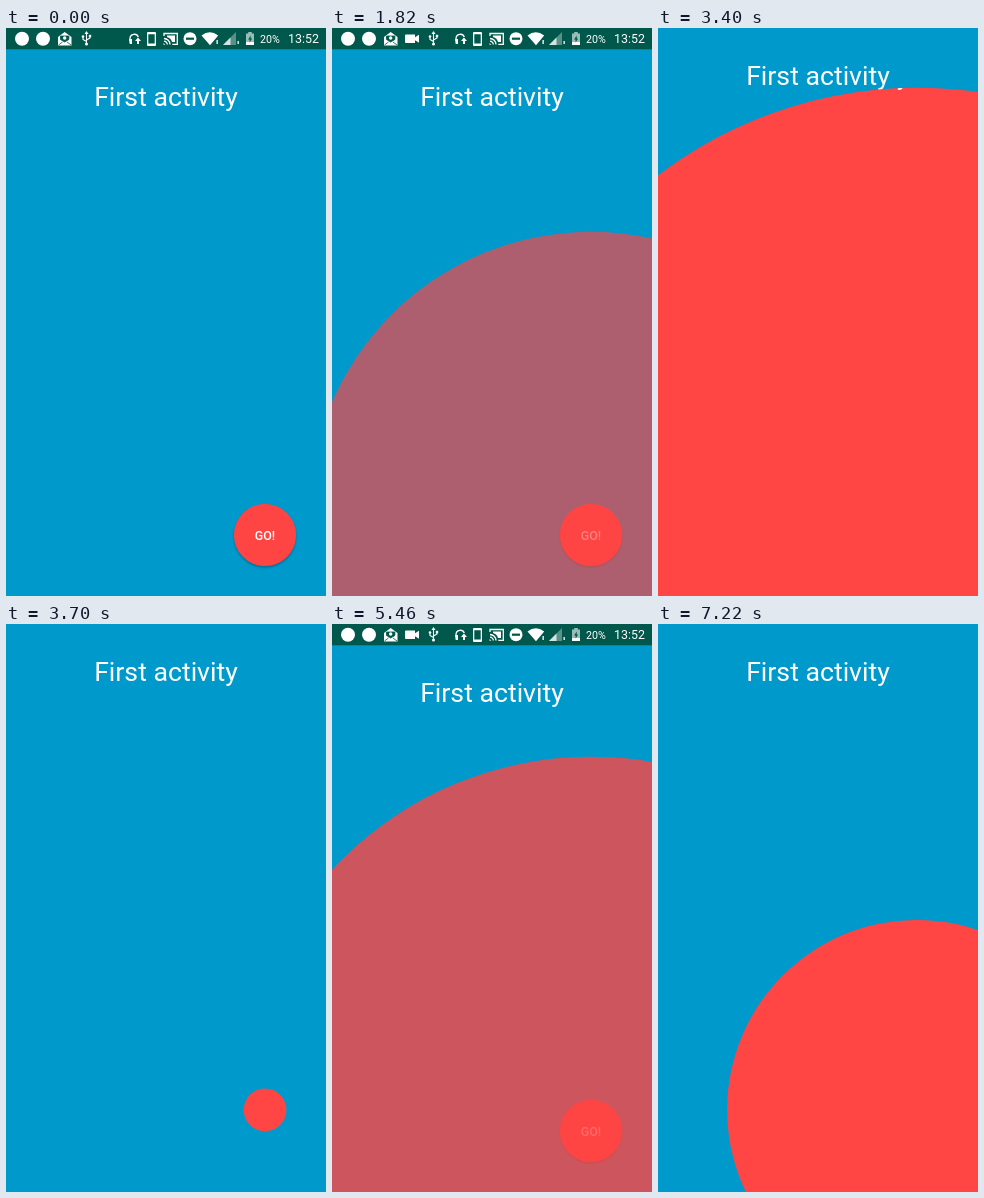
An HTML page that plays this animation: 320x568 px, repeating every 7.3 s.

```html
<!DOCTYPE html>
<html lang="en">
<head>
<meta charset="utf-8">
<title>Circular reveal</title>
<style>
  html, body { margin: 0; width: 100%; height: 100%; overflow: hidden; background: #09c; }
  svg { display: block; width: 100%; height: 100%; }
  text { font-family: Roboto, sans-serif; fill: #fff; }
  .title { font-size: 26.67px; text-anchor: middle; }
  .go { font-size: 12.44px; font-weight: 500; text-anchor: middle; }
  .line { fill: none; stroke: #fff; stroke-width: 1.3; }
</style>
</head>
<body>
<svg viewBox="0 0 320 568">
  <defs>
    <clipPath id="reveal"><circle id="hole" cx="259" cy="485.8" r="0"/></clipPath>
    <filter id="blur" x="-20%" y="-20%" width="140%" height="140%"><feGaussianBlur stdDeviation="1.3"/></filter>
  </defs>

  <rect width="320" height="568" fill="#09c"/>
  <text id="first" class="title" x="160" y="78">First activity</text>
  <g id="button">
    <circle cx="259" cy="508.6" r="31" fill="#024" opacity=".4" filter="url(#blur)"/>
    <circle cx="259" cy="507" r="31.1" fill="#f44"/>
    <text class="go" x="259" y="511.5">GO!</text>
  </g>

  <g id="second" clip-path="url(#reveal)">
    <rect width="320" height="568" fill="#ff4644"/>
    <text id="secondTitle" class="title" x="160" y="78">Second Activity</text>
  </g>

  <g id="bar" fill="#fff">
    <rect width="320" height="21.3" fill="#00574b"/>
    <circle cx="16" cy="10.7" r="7"/>
    <circle cx="37" cy="10.7" r="7"/>
    <g id="mail">
      <path d="M52 9 58.700 4 65.500 9V17.500H52Z"/>
      <path d="M54.500 8h8.400v3.500l-4.200 2.500-4.200-2.500zM52.500 17l4-3M65 17l-4-3" fill="#00574b" stroke="#00574b" stroke-width=".8"/>
      <circle cx="58.700" cy="10" r="1.700"/>
    </g>
    <g id="camera"><path d="M74 6.500h9v2.800l4-2.500v8l-4-2.500v2.700h-9q-1 0-1-1v-6.500q0-1 1-1z"/></g>
    <g id="usb">
      <path class="line" d="M80.500 5v11M80.500 13.500 77 11.500V8.500M80.500 12l3.500-2V7.500" style="stroke-width:1.100"/>
      <path d="M80.500 3l2 3h-4z"/>
      <circle cx="80.500" cy="16" r="1.500"/>
      <circle cx="77" cy="8.500" r="1.300"/>
      <rect x="82.800" y="6.800" width="2.400" height="2.400"/>
    </g>
    <path class="line" d="M124 13v-2.500a4.300 4.300 0 0 1 8.300-1.500"/>
    <path d="M123.400 11h2.600v5h-1.500q-1.100 0-1.100-1.200zM132 9.500l3 3.500h-2v3h-2v-3h-2z"/>
    <path fill-rule="evenodd" d="M142 4h7q1 0 1 1v12q0 1-1 1h-7q-1 0-1-1V5q0-1 1-1zM142.300 6.200v9.400h6.400V6.200z"/>
    <path class="line" d="M158 8V5.500h13.300v10.800h-5M158 10.500a6 6 0 0 1 6 6M158 13.200a3.300 3.300 0 0 1 3.300 3.300"/>
    <path d="M161 7.500h8v6.500h-3q-1-4-5-5zM157.500 15l1.800 1.800h-1.800z"/>
    <circle cx="184" cy="10.700" r="6.500"/>
    <rect x="180" y="9.600" width="8" height="2.200" fill="#00574b"/>
    <path d="M195.500 7.500q8.300-6.500 16.700 0L204 17.300zM210.500 12h1.300v4h-1.300zM231.500 13h1.300v3h-1.300z"/>
    <path d="M230 4v13h-13z" opacity=".35"/>
    <path d="M224.500 9.500V17H217z" opacity=".75"/>
    <path d="M242.200 4h3.600v1.400h2.200V17h-8V5.400h2.200z" opacity=".6"/>
    <path d="M240 14h8v3h-8z"/>
    <path d="M244.700 7.500l-2.600 4h1.500v3l2.500-4h-1.400z" fill="#00574b"/>
    <text x="254" y="14.800" font-size="10.670">20%</text>
    <text x="282" y="15.300" font-size="12.440">13:52</text>
  </g>
</svg>

<script>
const LOOP = 7300, BAR = 21.3, RADIUS = 625, REVEAL = 600;
const cycles = [{ open: 1418, close: 3172 }, { open: 5010, close: 6844 }];
const el = {};
document.querySelectorAll('[id]').forEach(node => { el[node.id] = node; });

const ramp = (t, from, to) => Math.min(1, Math.max(0, (t - from) / (to - from)));
const ease = p => (1 - Math.cos(Math.PI * p)) / 2;
const shift = (node, x, y) => node.setAttribute('transform', `translate(${x} ${y})`);

function render(t) {
  const cycle = cycles.filter(c => t >= c.open).pop();
  const opened = cycle ? t - cycle.open : -1;
  const closed = cycle ? t - cycle.close : -1;

  // Opening accelerates; closing eases both ways.
  const radius = closed < 0
    ? RADIUS * ramp(opened, 0, REVEAL) ** 2
    : RADIUS * (1 - ease(ramp(closed, 0, REVEAL)));
  el.hole.setAttribute('r', radius);
  el.second.setAttribute('opacity', ramp(opened, 130, 530));
  el.second.style.display = radius > 0 ? '' : 'none';

  const hidden = ease(ramp(opened, 450, 630)) - ease(ramp(closed, 980, 1280));
  const lift = -BAR * hidden;
  for (const id of ['bar', 'first', 'secondTitle']) shift(el[id], 0, lift);

  el.button.setAttribute('opacity', opened < REVEAL ? 1 : ramp(closed, 700, 1080));

  const recording = t >= 70;
  el.camera.style.display = recording ? '' : 'none';
  shift(el.usb, recording ? 21 : 0, 0);
}

const start = performance.now();
function tick() {
  render((performance.now() - start) % LOOP);
  requestAnimationFrame(tick);
}
render(0);
requestAnimationFrame(tick);
</script>
</body>
</html>
```
